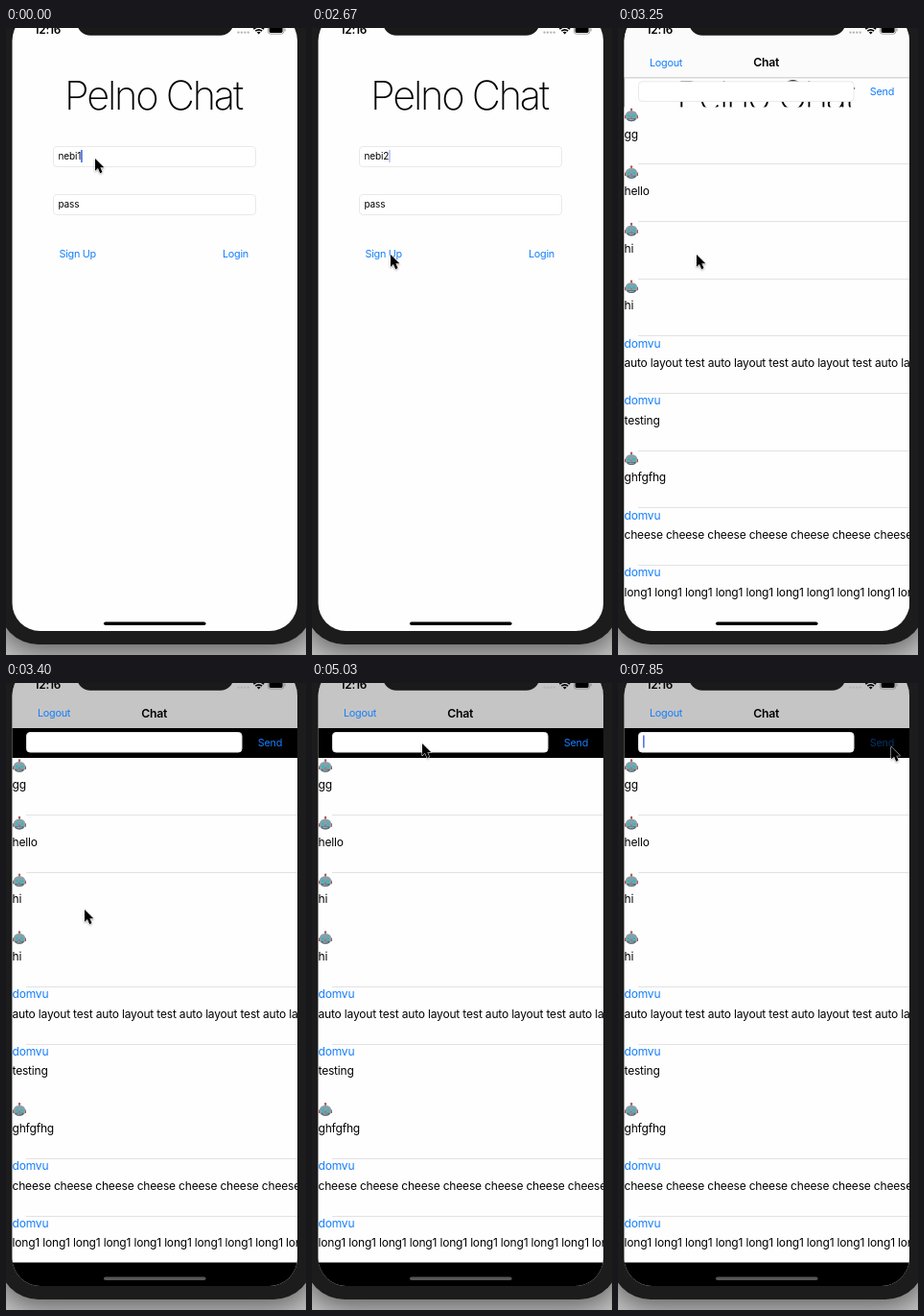
These frames come from a looping animation (313x653 px, 8000 ms). An HTML page:

```html
<!DOCTYPE html>
<html lang="en">
<head>
<meta charset="utf-8">
<title>Chat sign-up</title>
<style>
  html, body { margin: 0; width: 100%; height: 100%; overflow: hidden; background: #c4c4c4; }
  svg { display: block; width: 313px; height: 653px; }
  text { font-family: Inter, "Open Sans", sans-serif; white-space: pre; fill: #000; }
  .title { font-size: 41.5px; font-weight: 150; letter-spacing: -2.2px; text-anchor: middle; }
  .body { font-size: 12px; letter-spacing: -.18px; }
  .button { font-size: 10.8px; letter-spacing: -.25px; }
  .input { font-size: 10px; letter-spacing: -.15px; }
  .bold { font-size: 12.2px; font-weight: 600; letter-spacing: -.25px; }
  .clock { font-size: 11.8px; font-weight: 600; letter-spacing: -.2px; }
  .blue { fill: #147efb; }
  .field { fill: #fff; stroke: #e9e9e9; }
  .line { stroke: #e2e2e2; shape-rendering: crispEdges; }
  .caret { fill: #4169e8; }
</style>
</head>
<body>
<svg viewBox="0 0 313 653">
  <defs>
    <clipPath id="screen"><rect x="6.5" y="-16" width="297.5" height="644" rx="29"/></clipPath>
    <filter id="shadow" x="-20%" y="-10%" width="140%" height="120%">
      <feDropShadow dx="0" dy="8" stdDeviation="14" flood-opacity=".5"/>
    </filter>
    <g id="robot">
      <path d="M14 80V83" stroke="#6d7f88" stroke-width="1.6"/>
      <circle cx="14" cy="80.4" r="1.2" fill="#b9564e"/>
      <path d="M7 86.5h1.6v3.5H7zM19.4 86.5H21v3.5h-1.6z" fill="#a8584d"/>
      <path d="M7.8 87Q8.2 82 14 82T20.2 87Q20.4 92.8 14 92.8T7.8 87Z" fill="#86a0aa"/>
      <path d="M9.2 89.8H18.8Q18.2 92.8 14 92.8T9.2 89.8Z" fill="#55676f"/>
      <circle cx="11.4" cy="87" r="1.5" fill="#35b9bf"/>
      <circle cx="16.6" cy="87" r="1.5" fill="#35b9bf"/>
      <path d="M14 87.3L14.9 89H13.1Z" fill="#b9564e"/>
      <path d="M11.5 91H16.5" stroke="#d5dde0" stroke-dasharray="1 .6"/>
    </g>
  </defs>

  <rect x="-8" y="-60" width="329" height="702" rx="42" fill="#1a1a1a" filter="url(#shadow)"/>

  <g clip-path="url(#screen)">
    <rect width="313" height="653" y="-16" fill="#fefefe"/>
    <text class="title" x="153.5" y="84.5">Pelno Chat</text>
    <rect class="field" x="49.5" y="123.5" width="211" height="21" rx="3.5"/>
    <rect class="field" x="49.5" y="173.5" width="211" height="21" rx="3.5"/>
    <text class="input" id="user" x="54.5" y="137.2"></text>
    <rect class="caret" id="userCaret" y="127" width="1.6" height="13"/>
    <text class="input" x="54.5" y="187.2">pass</text>
    <text class="button blue" id="signUp" x="55.5" y="238.8">Sign Up</text>
    <text class="button blue" x="226" y="238.8">Login</text>

    <rect id="backdrop" y="-16" width="313" height="660"/>
    <g id="chat">
      <rect y="-21" width="313" height="68" fill="#fafafa" fill-opacity=".79"/>
      <path id="hairline" d="M0 47.5H313" stroke="#c4c4c4"/>
      <text class="button blue" x="33" y="35.4">Logout</text>
      <text class="bold" x="141.3" y="35.9">Chat</text>
      <rect class="field" x="21.5" y="51.5" width="224.5" height="20.5" rx="3.5"/>
      <text class="input" id="message" x="26" y="65.3"></text>
      <rect class="caret" id="messageCaret" y="54.5" width="1.6" height="13"/>
      <text class="button blue" id="send" x="262.8" y="65.8">Send</text>
      <rect y="78" width="313" height="525.5" fill="#fefefe"/>
      <g id="rows"></g>
    </g>

    <text class="clock" x="29.5" y="6.2">12:16</text>
    <path d="M242.5 4.6H254" stroke="#b4b4b4" stroke-width="2.4" stroke-linecap="round" stroke-dasharray="0 3.4"/>
    <path d="M258.3 1.2Q263.7 -3.6 269.1 1.2M260.3 3.2Q263.7 .4 267.1 3.2" fill="none" stroke="#000" stroke-width="1.6"/>
    <path d="M261.8 4.4Q263.7 3 265.6 4.4L263.7 6.4Z"/>
    <rect x="273.4" y="-2.5" width="16.4" height="8.6" rx="2.4" fill="none" stroke="#888" stroke-width=".8"/>
    <rect x="274.6" y="-1.4" width="14" height="6.4" rx="1.4"/>
    <path d="M291 .5v2.8" stroke="#888"/>
    <rect id="home" x="102" y="618.5" width="106.5" height="3.6" rx="1.8"/>
  </g>
  <rect x="74" y="-40" width="163.5" height="47.8" rx="14" fill="#1a1a1a"/>

  <path id="pointer" d="M0 0V14.6L3.4 11.5L5.9 17.2L8.5 16L6.1 10.5H10.6Z" stroke="#fff" stroke-width="1.1" paint-order="stroke"
        style="filter: drop-shadow(0 1px 1px rgba(0,0,0,.35))"/>
</svg>

<script>
const LOOP = 8000, TICKS = 54, ROW = 59.65;
const el = id => document.getElementById(id);

// Rows without an author show the robot.
const messages = [
  ['', 'gg'], ['', 'hello'], ['', 'hi'], ['', 'hi'],
  ['domvu', 'auto layout test '.repeat(4)], ['domvu', 'testing'], ['', 'ghfgfhg'],
  ['domvu', 'cheese '.repeat(8)], ['domvu', 'long1 '.repeat(11)]
];
el('rows').innerHTML = messages.map(([author, text], i) => `
  <g transform="translate(0 ${i * ROW})">
    ${author ? `<text class="body blue" x="6.5" y="89.7">${author}</text>` : '<use href="#robot"/>'}
    <text class="body" x="6.5" y="110.2">${text}</text>
    ${i < 8 ? `<path class="line${i % 3 === 2 && i < 7 ? ' faint' : ''}" d="M21 137.5H313"/>` : ''}
  </g>`).join('');
const faintLines = document.querySelectorAll('.faint');

// Timelines of [tick, value...]
const userText = [[0, 'nebi1'], [5, 'nebi'], [11, 'nebi2']];
const userBlink = [[0, 1], [2, .5], [3, 0], [5, 1], [9, .5], [10, 0], [11, 1], [15, .5], [16, 0], [18, .4], [19, 1]];
const messageText = [[0, ''], [41, 'h'], [42, 'hi'], [43, 'hih'], [44, 'hihi'], [53, '']];
const messageBlink = [[0, 0], [36, 1], [40, 0], [41, 1], [50, .5], [51, 0], [53, .9]];
const pointerPath = [
  [0, 93, 136], [13, 93, 136], [18, 82, 236], [23, 82, 236], [29, 87, 137], [34, 115, 63],
  [46, 115, 63], [47, 192, 64.5], [48, 250, 68], [49, 276, 68], [50, 285, 66.5], [54, 285, 66.5]
];

const step = (keys, k) => keys.filter(key => key[0] <= k).pop()[1];

function along(keys, k) {
  const i = keys.findIndex(key => key[0] > k);
  const [t0, x0, y0] = keys[i - 1], [t1, x1, y1] = keys[i];
  const p = (k - t0) / (t1 - t0);
  return [x0 + (x1 - x0) * p, y0 + (y1 - y0) * p];
}

function type(id, text, blink) {
  const label = el(id), caret = el(id + 'Caret');
  label.textContent = text;
  caret.setAttribute('x', +label.getAttribute('x') + (text ? label.getComputedTextLength() : 0));
  caret.setAttribute('opacity', blink);
}

function draw(k) {
  const settled = k >= 23;
  type('user', step(userText, k), step(userBlink, k));
  type('message', step(messageText, k), step(messageBlink, k));
  el('signUp').setAttribute('opacity', k >= 19 ? .3 : 1);
  el('send').setAttribute('opacity', k >= 52 ? .4 : 1);

  // The chat sheet slides up, slowing down exponentially.
  const slide = settled ? 0 : 27 * 6.2 ** (21 - k);
  el('chat').setAttribute('transform', `translate(0 ${slide})`);
  el('chat').setAttribute('visibility', k >= 20 ? 'visible' : 'hidden');
  el('backdrop').setAttribute('opacity', settled ? 1 : 0);
  el('hairline').setAttribute('opacity', settled ? 0 : 1);
  el('home').setAttribute('fill', settled ? '#565656' : '#000');
  faintLines.forEach(line => line.setAttribute('opacity', settled ? 0 : 1));
  el('pointer').setAttribute('transform', `translate(${along(pointerPath, k)}) scale(.88)`);
}

function frame(now) {
  draw(Math.floor((now % LOOP) * TICKS / LOOP + .08) % TICKS);
  requestAnimationFrame(frame);
}
requestAnimationFrame(frame);
</script>
</body>
</html>
```
